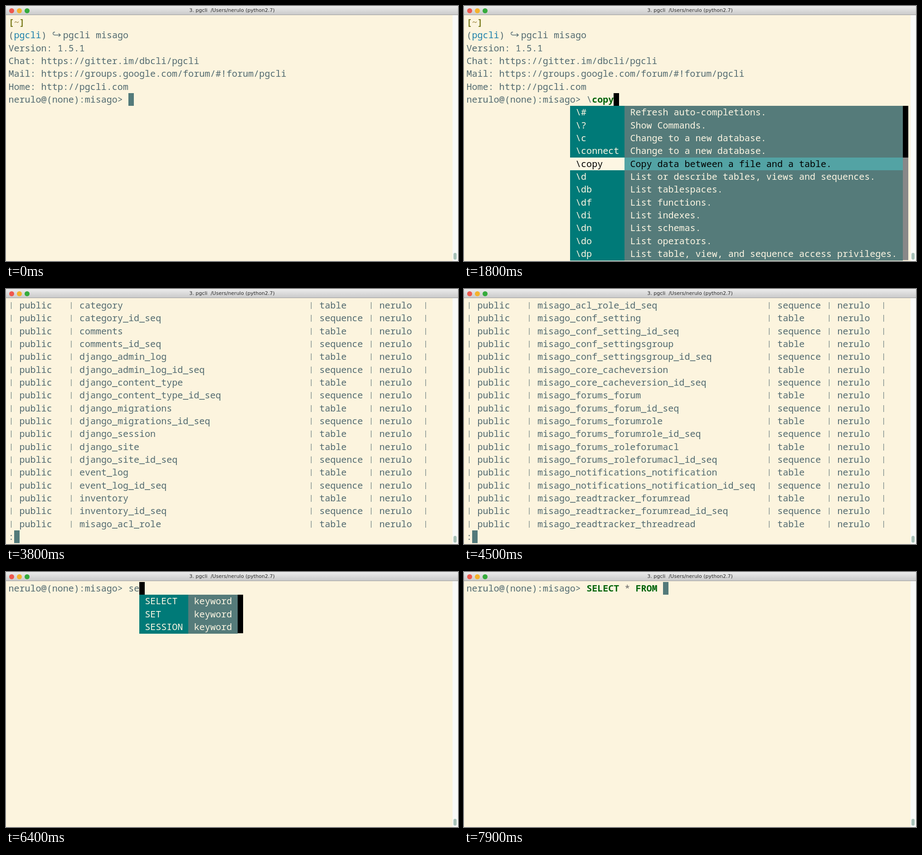
Recreate the animation shown at these times as an HTML page. Size 997 px wide and 562 px high, loop 8000 ms.

```html
<!DOCTYPE html>
<html lang="en">
<head>
<meta charset="utf-8">
<title>Terminal session</title>
<style>
  html, body { margin: 0; width: 100%; height: 100%; overflow: hidden; background: #fcf4de; }
  #stage { position: absolute; inset: 0; width: 997px; height: 562px; overflow: hidden; background: #fcf4de; }
  #bar {
    position: absolute; left: 0; top: 0; width: 100%; height: 20px; box-sizing: border-box;
    background: linear-gradient(#ececec, #cacaca); border-bottom: 1px solid #9d9d9d;
    font: 11px/20px "DejaVu Sans", sans-serif; color: #2c2c2c; text-align: center; white-space: pre;
  }
  #bar i { position: absolute; top: 4.5px; width: 11px; height: 11px; border-radius: 50%; }
  #track { position: absolute; right: 0; top: 20px; width: 12px; bottom: 0; background: #fafaf8; }
  #track i { position: absolute; left: 2px; bottom: 3px; width: 7px; height: 15px; border-radius: 4px; background: #a9c2b9; }
  #screen { color: #526a70; font: 20.05px/28.33px "Noto Sans Mono", "DejaVu Sans Mono", monospace; white-space: pre; }
  #screen b, #screen svg { position: absolute; display: block; }
  #screen b { height: 28.33px; font-weight: 400; }
  #screen .bar { width: 12.03px; margin-top: -1px; font-size: 14px; text-align: center; }
  #screen .kw { color: #00640a; font-weight: 600; }
  #screen .op { color: #666; }
  #screen .olive { color: #7c7d1f; font-weight: 600; }
  #screen .tilde { color: #9a8440; }
  #screen .blue { color: #1b80ab; }
  .item { background: #007a78; color: #fdf6e3; }
  .meta { background: #557b7a; color: #fdf6e3; }
  .item.on { background: #fdf6e3; color: #000; }
  .meta.on { background: #53a3a4; color: #000; }
</style>
</head>
<body>
<div id="stage">
  <div id="screen"></div>
  <div id="track"><i></i></div>
  <div id="bar"><i style="left:6.5px;background:#ee584e"></i><i style="left:23.5px;background:#f4b32c"></i><i style="left:40.5px;background:#35ab3c"></i>3. pgcli  /Users/nerulo (python2.7)</div>
</div>
<script>
const CELL = 12.03, ROW = 28.33, LEFT = 5.5, TOP = 22, LOOP = 8000;
const USER = "nerulo";
const PROMPT = USER + "@(none):misago> ";
const START = PROMPT.length;

const text = (row, col, str, cls = "") =>
  `<b class="${cls}" style="left:${LEFT + col * CELL}px;top:${TOP + row * ROW}px">${str}</b>`;

const box = (row, col, w, h, color) =>
  `<b style="left:${LEFT + col * CELL}px;top:${TOP + row * ROW}px;width:${w * CELL}px;height:${h * ROW}px;background:${color}"></b>`;

const cell = (row, col, w, str, cls) =>
  `<b class="${cls}" style="left:${LEFT + col * CELL}px;top:${TOP + row * ROW}px;width:${w * CELL}px;height:${ROW + .4}px"> ${str}</b>`;

const cursor = (row, col, dark) => box(row, col, 1, 1, dark ? "#000" : "#537a7a");

// Input after the prompt, with SQL keywords highlighted.
function prompt(row, input = "", mode = "") {
  let out = text(row, 0, PROMPT);
  for (const m of input.matchAll(/[A-Z]+|copy|\*|[^\sA-Z*]/g)) {
    const cls = /^([A-Z]+|copy)$/.test(m[0]) ? "kw" : m[0] === "*" ? "op" : "";
    out += text(row, START + m.index, m[0], cls);
  }
  return mode === "hidden" ? out : out + cursor(row, START + input.length, mode === "dark");
}

// Completion menu: items are [name, description].
function menu(row, col, items, nameW, metaW, thumb, sel = -1) {
  const bar = col + nameW + metaW;
  return items.map(([name, info], i) => {
    const on = i === sel ? " on" : "";
    return cell(row + i, col, nameW, name, "item" + on) + cell(row + i, col + nameW, metaW, info, "meta" + on);
  }).join("") + box(row, bar, 1, items.length, "#888") + box(row, bar, 1, thumb, "#000");
}

const hook = `<svg style="left:100px;top:52px" width="24" height="22" fill="none" stroke="#526a70" stroke-width="1.4">
  <path d="M8 5.5H7a3 3 0 0 0 0 6.5h13M16 8.5l4 3.5-4 3.5"/></svg>`;

const shell =
  text(0, 0, "[", "olive") + text(0, 1, "~", "tilde") + text(0, 2, "]", "olive") +
  text(1, 0, "(") + text(1, 1, "pgcli", "blue") + text(1, 6, ")") + hook + text(1, 10, "pgcli misago") +
  ["Version: 1.5.1", "Chat: https://gitter.im/dbcli/pgcli",
   "Mail: https://groups.google.com/forum/#!forum/pgcli", "Home: http://pgcli.com"]
    .map((s, i) => text(2 + i, 0, s)).join("");

const commands = [
  ["\\#", "Refresh auto-completions."],
  ["\\?", "Show Commands."],
  ["\\c", "Change to a new database."],
  ["\\connect", "Change to a new database."],
  ["\\copy", "Copy data between a file and a table."],
  ["\\d", "List or describe tables, views and sequences."],
  ["\\db", "List tablespaces."],
  ["\\df", "List functions."],
  ["\\di", "List indexes."],
  ["\\dn", "List schemas."],
  ["\\do", "List operators."],
  ["\\dp", "List table, view, and sequence access privileges."]
];
const keywords = ["SELECT", "SET", "SESSION"].map(k => [k, "keyword"]);
const functions = "abs bit char date float int interval left length max min mod name now replace right"
  .split(" ").map(f => [`"${f}"()`, "function"]);

// Table listing; a "+" suffix adds the matching id sequence.
const names = `CROW INSERT abDEFC abc abdec auth_group+ auth_group_permissions+ auth_permission+
  bigserial_tbl bigserial_tbl_a_seq binary binarydata
  category+ comments+ django_admin_log+ django_content_type+ django_migrations+ django_session django_site+
  event_log+ inventory+ misago_acl_role+ misago_conf_setting+ misago_conf_settingsgroup+
  misago_core_cacheversion+ misago_forums_forum+ misago_forums_forumrole+ misago_forums_roleforumacl+
  misago_notifications_notification+ misago_readtracker_forumread+ misago_readtracker_threadread+
  misago_threads_event+ misago_threads_label+ misago_threads_post+ misago_threads_thread+
  misago_users_ban+ misago_users_rank+ misago_users_user+ misago_users_warning+ misago_users_warninglevel`
  .trim().split(/\s+/).flatMap(n => n.endsWith("+") ? [n.slice(0, -1), n.slice(0, -1) + "_id_seq"] : [n]);

const EDGES = [0, 11, 55, 66, 76];
const dashes = EDGES.slice(1).map((e, i) => "-".repeat(e - EDGES[i] - 1)).join("+");
const bars = (row, cols) => cols.map(c => text(row, c, "|", "bar")).join("");
const record = (...vals) => row => bars(row, EDGES) + vals.map((v, i) => text(row, EDGES[i] + 2, v)).join("");

const listing = [
  row => text(row, 0, "+" + dashes + "+"),
  record("Schema", "Name", "Type", "Owner"),
  row => bars(row, [0, 76]) + text(row, 1, dashes),
  ...names.map(n => record("public", n, n.endsWith("_seq") ? "sequence" : "table", USER))
];

const page = n => () =>
  listing.slice(n * 18, n * 18 + 18).map((line, i) => line(i)).join("") + text(18, 0, ":") + cursor(18, 1);

const slash = sel => () =>
  shell + prompt(6, sel < 0 ? "\\" : commands[sel][0], "dark") + menu(7, 19, commands, 10, 51, 4, sel);

const query = (input, mode) => () => prompt(0, input, mode);
const complete = (input, sel) => () => prompt(0, input, "dark") + menu(1, 24, keywords, 9, 9, 3, sel);
const funcs = () => prompt(0, "SELECT ", "dark") + menu(1, 20, functions, 50, 10, 1);
const wipe = () => prompt(0, "SELECT *", "hidden") + menu(14, 20, functions.slice(-3), 50, 10, 0);

const steps = [
  [0, () => shell + prompt(6)],
  [600, () => shell + prompt(6, "\\")],
  [700, slash(-1)],
  [1000, slash(0)],
  [1200, slash(1)],
  [1400, slash(2)],
  [1600, slash(3)],
  [1800, slash(4)],
  [2000, slash(5)],
  [2300, () => shell + prompt(6, "\\d")],
  [2400, page(0)],
  [3600, page(1)],
  [4200, page(2)],
  [5000, page(3)],
  [5400, () => shell + prompt(6, "\\d", "hidden") + prompt(7)],
  [5700, query("")],
  [6200, query("s")],
  [6300, query("se")],
  [6400, complete("se")],
  [6700, complete("SELECT", 0)],
  [6900, query("SELECT ")],
  [7000, funcs],
  [7300, wipe],
  [7400, query("SELECT *")],
  [7500, query("SELECT * ")],
  [7600, query("SELECT * f")],
  [7700, query("SELECT * fr")],
  [7800, query("SELECT * FROM")],
  [7900, query("SELECT * FROM ")]
];

const screen = document.getElementById("screen");
const began = performance.now();
let shown = -1;

function draw() {
  const t = (performance.now() - began) % LOOP;
  const now = steps.findLastIndex(s => s[0] <= t);
  if (now !== shown) {
    shown = now;
    screen.innerHTML = steps[now][1]();
  }
  requestAnimationFrame(draw);
}
draw();
</script>
</body>
</html>
```
